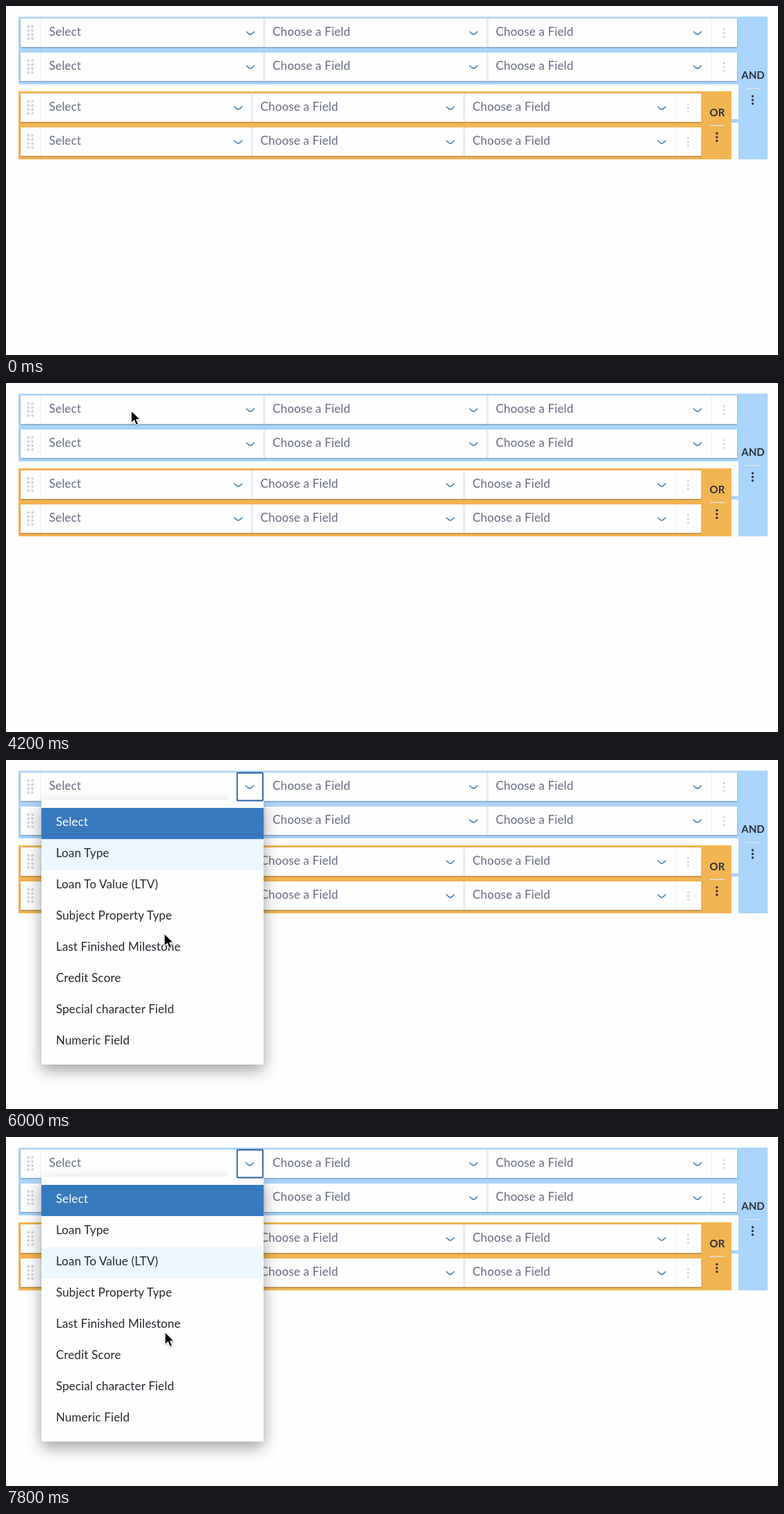
Recreate the animation shown at these times as an HTML page. Size 1112x503 px, loop 8 s.

```html
<!DOCTYPE html>
<html lang="en">
<head>
<meta charset="utf-8">
<title>Rule builder</title>
<style>
  html, body { margin: 0; width: 100%; height: 100%; overflow: hidden; background: #fefefd; }
  svg { display: block; width: 1112px; height: 503px; font: 17px Lato, "Open Sans", sans-serif; letter-spacing: .15px; }
  text { fill: #656a82; white-space: pre; }
  .card { fill: #fefefe; filter: drop-shadow(0 1px 1px rgba(30, 45, 75, .42)); }
  .divider { fill: #e9eaee; }
  .edge { fill: #f3f4f6; }
  .dots { fill: #ccd4e2; }
  .active .dots { fill: #17497f; }
  .active .edge { fill: #e9eaee; }
  .chevron { fill: none; stroke: #2f78ae; stroke-width: 1.4; stroke-linecap: round; stroke-linejoin: round; }
  .operator { font-weight: 700; font-size: 15px; letter-spacing: 0; text-anchor: middle; fill: #2c3038; }
  .menu-box { fill: #fefefe; filter: drop-shadow(0 8px 11px rgba(0, 0, 0, .38)); }
  .option { fill: #24272e; }
  .option.selected { fill: #fff; }
  #cursor { filter: drop-shadow(0 1px 1px rgba(0, 0, 0, .3)); }
</style>
</head>
<body>
<svg id="stage" viewBox="0 0 1112 503"></svg>
<script>
const STEP = 200, LOOP = 8000, OPEN_AT = 5200;
const MENU_TOP = 69, ITEM = 45;
const OPTIONS = ["Select", "Loan Type", "Loan To Value (LTV)", "Subject Property Type",
  "Last Finished Milestone", "Credit Score", "Special character Field", "Numeric Field"];

// Pointer path: [time, x, y], sampled once per step.
const PATH = [
  [2400, 3, 166], [2600, 12, 112], [2800, 25, 62], [3000, 31, 38], [3200, 32, 34],
  [3600, 34, 35], [4400, 229, 41], [5400, 229, 41], [5600, 229, 62], [5800, 228, 150],
  [6000, 228, 250], [6200, 228, 286], [6400, 226, 195], [6600, 225, 140], [6800, 225, 164],
  [7000, 227, 246], [7200, 229, 326], [7400, 228, 248], [7600, 227, 186], [7800, 229, 281],
];

const rect = (x, y, w, h, attrs = "") =>
  `<rect x="${x}" y="${y}" width="${w}" height="${h}" ${attrs}/>`;
const label = (x, y, text, cls = "") => `<text x="${x}" y="${y}" class="${cls}">${text}</text>`;
const chevron = (x, y) => `<path class="chevron" d="M${x - 5.5} ${y - 2}Q${x - 2} ${y + 2} ${x} ${y + 2}T${x + 5.5} ${y - 2}"/>`;
const dots = (xs, ys, r) =>
  xs.flatMap(x => ys.map(y => `<circle cx="${x}" cy="${y}" r="${r}"/>`)).join("");

function row(y, width, cells, id = "") {
  const end = 21 + width, last = cells[2];
  const starts = [51, cells[0] + 1, cells[1] + 1];
  const fields = starts.map((x, i) =>
    label(x + 11, y + 25, i ? "Choose a Field" : "Select") +
    `<g class="${i ? "" : "first"}">${chevron(cells[i] - 20, y + 21)}</g>`).join("");
  const kebabX = (last + end) / 2 - .5;
  return `<g id="${id}">
    ${rect(21, y, width, 41, 'class="card"')}
    ${rect(49, y, 2, 41, 'class="edge"')}${rect(last - 1, y, 2, 41, 'class="edge"')}
    ${cells.slice(0, 2).map(x => rect(x - 1.5, y, 3, 41, 'class="divider"')).join("")}
    <g class="dots">${dots([32, 38], [11.5, 17.3, 23.1, 29].map(d => y + d), 1.9)}
      ${dots([kebabX], [15.5, 21, 26.5].map(d => y + d), 1.6)}</g>
    ${fields}</g>`;
}

const operator = (x, y, text) =>
  label(x, y, text, "operator") + rect(x - 10.5, y + 13, 21, 1.5, 'fill="#dfe2e8"') +
  `<g fill="#2c3038">${dots([x - .5], [25, 30.4, 35.8].map(d => y + d), 1.7)}</g>`;

const BLUE = 'fill="#aad4fb"', AMBER = 'fill="#f3b551"';
const stage = document.getElementById("stage");
stage.innerHTML = `
  ${rect(18, 15.5, 1079, 97.5, BLUE)}${rect(1055, 15.5, 42, 205.5, BLUE)}${rect(1045, 163, 11, 5, BLUE)}
  ${rect(18, 123, 1027, 98, AMBER)}
  ${row(18, 1032, [372, 693.5, 1016], "active-row")}
  ${row(67, 1032, [372, 693.5, 1016])}
  ${row(126, 980.5, [354.5, 660, 964.5])}
  ${row(175, 980.5, [354.5, 660, 964.5])}
  ${operator(1076, 105, "AND")}
  ${operator(1024.5, 158.5, "OR")}
  <g id="menu">
    ${rect(51, 59, 320, 380, 'rx="1" class="menu-box"')}
    ${rect(51, 57, 320, 4, 'fill="#fefefe"')}
    ${rect(320, 18, 55, 41, 'fill="#fefefe"')}
    ${rect(333, 18.5, 37, 40, 'rx="1" fill="#fefefe" stroke="#225f9f" stroke-width="1.8"')}
    ${chevron(351, 39)}
    ${rect(51, MENU_TOP, 320, ITEM, 'fill="#3679bd"')}
    ${rect(51, MENU_TOP, 320, ITEM, 'id="hover" fill="#ecf6fe"')}
    ${OPTIONS.map((text, i) => label(72, 95 + i * ITEM, text, i ? "option" : "option selected")).join("")}
    ${rect(109, 30, 1.5, 18, 'id="caret" fill="#24272e"')}
  </g>
  <path id="cursor" d="M0 0V18.5L4.3 14.5 7.2 21.3 10.6 19.9 7.7 13.2H13.5Z"
    fill="#000" stroke="#fff" stroke-width="1.2" stroke-linejoin="round"/>`;

const [activeRow, menu, hover, caret, cursor] =
  ["active-row", "menu", "hover", "caret", "cursor"].map(id => document.getElementById(id));
const show = (el, on) => { el.style.display = on ? "" : "none"; };

function pointerAt(t) {
  const next = PATH.findIndex(p => p[0] > t);
  if (next < 0) return PATH[PATH.length - 1].slice(1);
  if (next === 0) return null;
  const [t0, x0, y0] = PATH[next - 1], [t1, x1, y1] = PATH[next];
  const k = (t - t0) / (t1 - t0);
  return [x0 + (x1 - x0) * k, y0 + (y1 - y0) * k];
}

function draw(time) {
  const t = Math.floor(time % LOOP / STEP) * STEP;
  const pointer = pointerAt(t), open = t >= OPEN_AT;

  show(cursor, pointer);
  if (pointer) cursor.setAttribute("transform", `translate(${pointer})`);
  activeRow.setAttribute("class", t >= 4400 && pointer[1] < 60 ? "active" : "");

  show(menu, open);
  if (!open) return;
  // The hover highlight trails the pointer by one step.
  const item = Math.floor((pointerAt(t - STEP)[1] - MENU_TOP) / ITEM);
  show(hover, item > 0);
  hover.setAttribute("y", MENU_TOP + item * ITEM);
  show(caret, Math.floor((t - OPEN_AT) / 500) % 2 === 0);
}

const start = performance.now();
function tick() {
  draw(performance.now() - start);
  requestAnimationFrame(tick);
}
tick();
</script>
</body>
</html>
```
